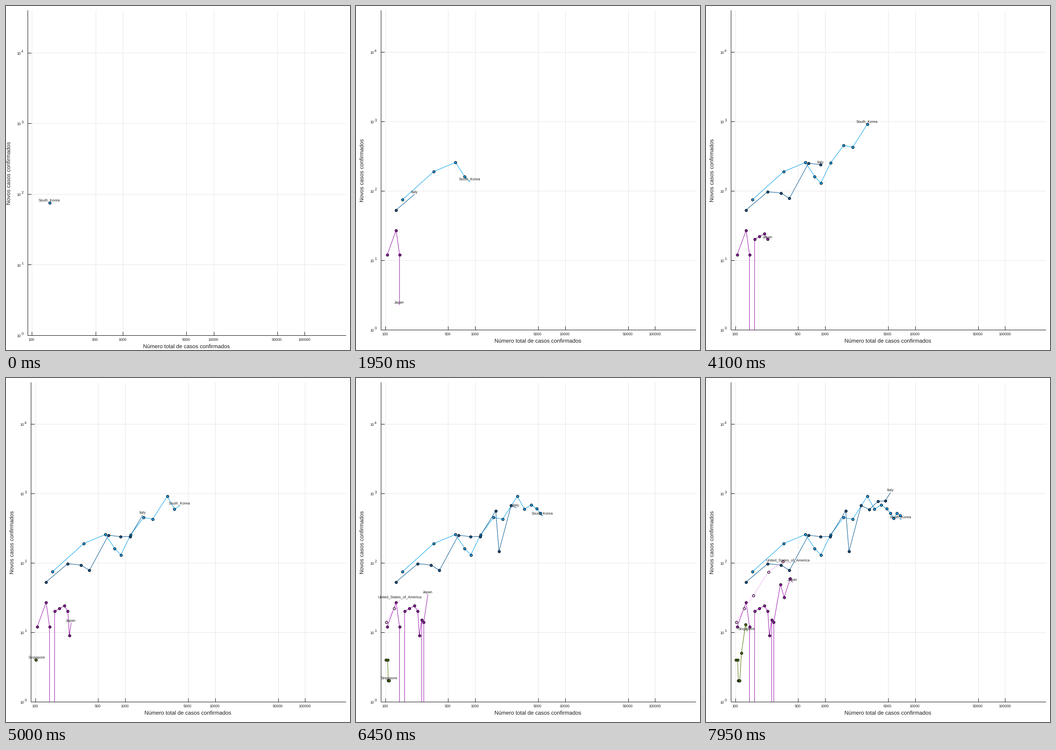
Recreate the animation shown at these times as a matplotlib script. Size 748 px wide and 748 px high, loop 8 s.

```python
import math
import matplotlib.pyplot as plt
from matplotlib.animation import FuncAnimation
from matplotlib.collections import LineCollection
from matplotlib.patches import Rectangle

SIZE, DPI = 748, 100
FRAMES, INTERVAL = 160, 50
DAYS_PER_FRAME = 0.09769
TINY = 1e-200          # stands in for zero on the log axis
INK = "#1c1c1c"

plt.rcParams["font.family"] = "Liberation Sans"
plt.rcParams["text.hinting"] = "none"
plt.rcParams["text.hinting_factor"] = 1


def px(n):
    """Pixels to points."""
    return n * 72 / DPI


# name, colour, first day, total before the first day, new cases per day
SERIES = [
    ("South_Korea", "#009fee", 0, 81,
     [75, 190, 256, 161, 130, 253, 449, 427, 909, 595, 686, 600, 516, 438,
      518, 483, 367]),
    ("Japan", "#9a0fad", 1, 93,
     [12, 27, 12, 0, 20, 22, 24, 20, 9, 15, 0, 14, 49, 32, 59, 47]),
    ("Italy", "#00558f", 3, 79,
     [53, 97, 93, 78, 250, 238, 240, 561, 146, 667, 587, 769, 778, 1247]),
    ("Singapore", "#4b7000", 9, 98, [4, 4, 2, 2, 2, 5, 13, 8]),
    ("United_States_of_America", "#f4b4f4", 11, 89, [14, 22, 34, 74, 105, 95]),
]


class Layout:
    """Pixel geometry of the log-log plot."""

    top, right = 9, 739

    def __init__(self, left, bottom, x100, x_dec, y_dec, x_title, y_title):
        self.left, self.bottom = left, bottom
        self.x100, self.x_dec, self.y_dec = x100, x_dec, y_dec
        self.x_title, self.y_title = x_title, y_title

    def x(self, v):
        return self.x100 + self.x_dec * (math.log10(v) - 2)

    def y(self, v):
        return self.bottom - self.y_dec * math.log10(max(v, TINY))


FIRST = Layout(47, 715.3, 56, 197.6, 153.55, (392, 739.5), (6, 363))
MAIN = Layout(54, 703.3, 63.2, 195.6, 150.95, (395.3, 727.3), (13.5, 357))

fig = plt.figure(figsize=(SIZE / DPI, SIZE / DPI), dpi=DPI, facecolor="white")
ax = fig.add_axes([0, 0, 1, 1])
ax.set_xlim(-0.5, SIZE - 0.5)
ax.set_ylim(SIZE - 0.5, -0.5)
ax.set_axis_off()


def text(x, y, s, size, **kw):
    opts = dict(ha="center", va="baseline", color=INK, fontsize=px(size))
    opts.update(kw)
    return ax.text(x, y, s, **opts)


def build_axes(lay):
    """Draw grid, axes, ticks and titles; return the artists."""
    left, bottom, top, right = lay.left, lay.bottom, lay.top, lay.right
    parts, grid, black = [], [], [[(left, top), (left, bottom)],
                                  [(left, bottom), (right, bottom)]]
    for v in (100, 500, 1000, 5000, 10000, 50000, 100000):
        x = lay.x(v)
        grid.append([(x, top), (x, bottom)])
        black.append([(x, bottom), (x, bottom - 8)])
        parts.append(text(x - 1, bottom + 11.8, str(v), 8))
    for p in range(5):
        y = lay.y(10 ** p)
        if p:
            grid.append([(left, y), (right, y)])
        black.append([(left, y), (left + 8, y)])
        parts.append(text(left - 24.5, y + 4.2, "10", 8, ha="left"))
        parts.append(text(left - 14.2, y - 0.4, str(p), 8, ha="left"))
    for lines, colour, z in ((grid, "#e6e6e6", 0), (black, "#111111", 1)):
        lc = LineCollection(lines, colors=colour, linewidths=px(1), zorder=z)
        parts.append(ax.add_collection(lc, autolim=False))
    tx, ty = lay.x_title
    parts.append(text(tx, ty + 4, "Número total de casos confirmados", 12))
    tx, ty = lay.y_title
    parts.append(text(tx + 4, ty, "Novos casos confirmados", 12, rotation=90,
                      ha="right", va="center"))
    parts[-1].set_horizontalalignment("center")
    parts[-1].set_x(tx)
    return parts


layouts = [(FIRST, build_axes(FIRST)), (MAIN, build_axes(MAIN))]
clip = Rectangle((MAIN.left, MAIN.top - 5), MAIN.right - MAIN.left,
                 MAIN.bottom - MAIN.top + 5, transform=ax.transData)


class Track:
    """One country's growing path with its label."""

    def __init__(self, name, colour, start, total, new, z):
        self.start, self.points = start, []
        for n in new:
            total += n
            self.points.append((total, n))
        self.line, = ax.plot([], [], color=colour, lw=px(1), zorder=z)
        self.dots, = ax.plot([], [], "o", ms=px(5.4), mfc=colour, mec="black",
                             mew=px(1), zorder=z + 0.5)
        self.line.set_clip_path(clip)
        self.label = text(0, 0, name, 8.5, zorder=20)

    def update(self, day, lay):
        age = day - self.start
        shown = age >= 0
        for artist in (self.line, self.dots, self.label):
            artist.set_visible(shown)
        if not shown:
            return
        i = min(int(age), len(self.points) - 2)
        f = age - i
        (x0, y0), (x1, y1) = self.points[i:i + 2]
        head = (x0 + (x1 - x0) * f, y0 + (y1 - y0) * f)
        path = [(lay.x(a), lay.y(b)) for a, b in self.points[:i + 1] + [head]]
        xs, ys = zip(*path)
        self.line.set_data(xs, ys)
        dots = [p for p in path[:-1] if p[1] < lay.bottom]
        self.dots.set_data([p[0] for p in dots], [p[1] for p in dots])
        self.label.set_position((xs[-1] - 0.7, ys[-1] - 2.7))
        self.label.set_visible(ys[-1] < SIZE + 20)


tracks = [Track(*row, z=3 + k) for k, row in enumerate(SERIES)]


def draw(frame):
    current = 0 if frame == 0 else 1
    for k, (_, parts) in enumerate(layouts):
        for part in parts:
            part.set_visible(k == current)
    for track in tracks:
        track.update(frame * DAYS_PER_FRAME, layouts[current][0])
    return []


anim = FuncAnimation(fig, draw, frames=FRAMES, interval=INTERVAL, repeat=True)
plt.show()
```
